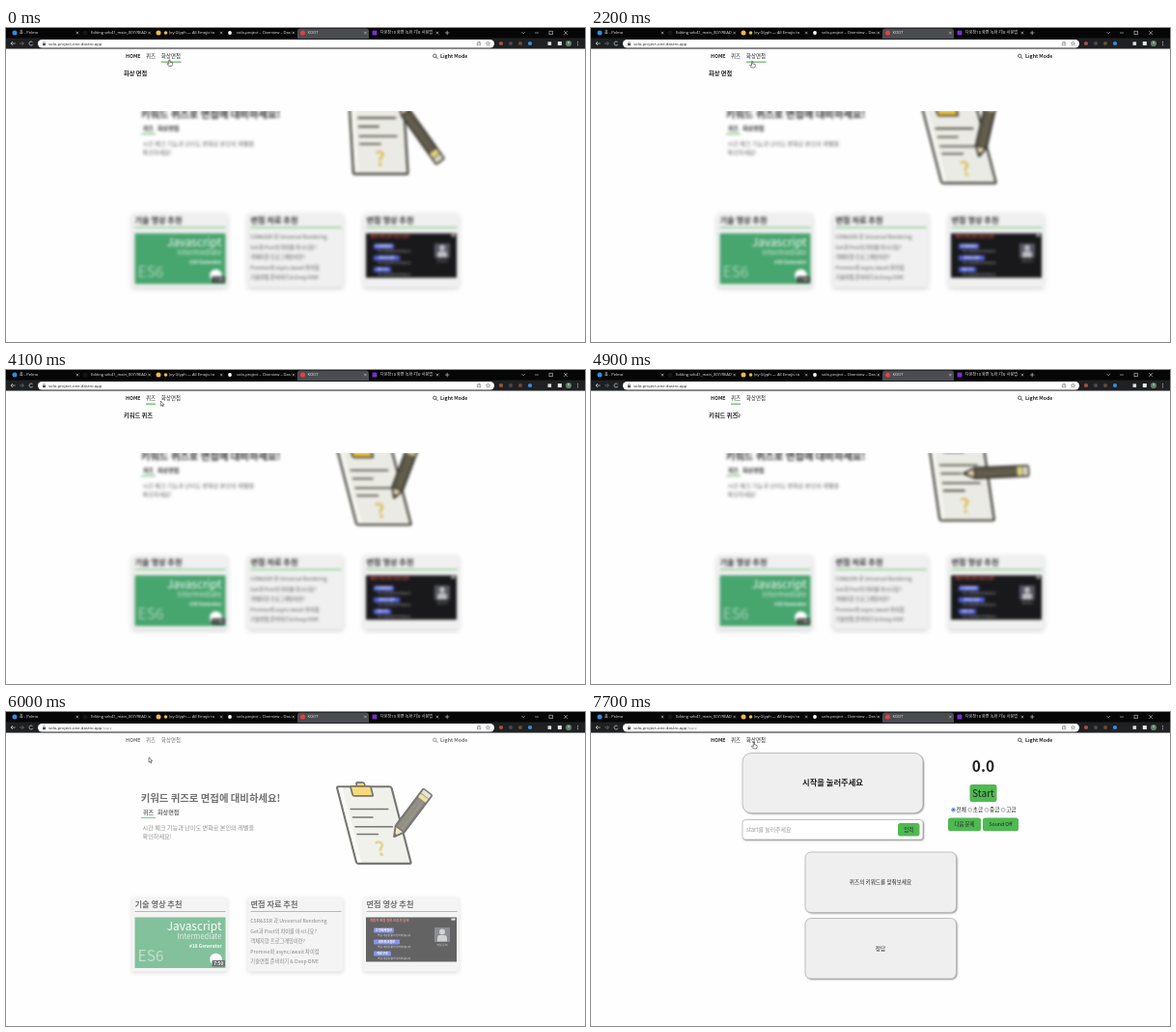
An HTML page with a canvas that plays this animation: 600x325 px, repeating every 8 s.

```html
<!DOCTYPE html>
<html lang="ko">
<head>
<meta charset="utf-8">
<title>KOOT</title>
<style>
html, body { margin: 0; width: 100%; height: 100%; overflow: hidden; background: #fff; }
canvas { display: block; width: 600px; height: 325px; }
</style>
</head>
<body>
<canvas id="stage"></canvas>
<script>
const W = 600, H = 325, LOOP = 8000;
const KR = '"Noto Sans CJK KR", "Noto Sans CJK", sans-serif';
const UI = '"Open Sans", "Noto Sans CJK KR", "Noto Sans CJK", sans-serif';
const GREEN = '#4caf50', INK = '#222', PAPER = '#fefefe';
const dpr = window.devicePixelRatio || 1;

function surface(el) {
  el.width = W * dpr;
  el.height = H * dpr;
  const ctx = el.getContext('2d');
  ctx.scale(dpr, dpr);
  return ctx;
}
const screen2d = surface(document.getElementById('stage'));
const pageCanvas = document.createElement('canvas');
const page2d = surface(pageCanvas);
let c = screen2d;

const clamp = v => Math.max(0, Math.min(1, v));
const ramp = (t, a, b) => clamp((t - a) / (b - a));
const ease = u => u * u * (3 - 2 * u);
const mix = (a, b, u) => a + (b - a) * u;

function text(s, x, cy, size, { color = INK, weight = 400, align = 'left', font = KR } = {}) {
  c.font = `${weight} ${size}px ${font}`;
  c.textAlign = align;
  c.fillStyle = color;
  c.fillText(s, x, cy + size * 0.36);
}
function rect(x, y, w, h, color) {
  c.fillStyle = color;
  c.fillRect(x, y, w, h);
}
function round(x, y, w, h, r, fill, stroke, lw = 1) {
  c.beginPath();
  c.roundRect(x, y, w, h, r);
  if (fill) { c.fillStyle = fill; c.fill(); }
  if (stroke) { c.strokeStyle = stroke; c.lineWidth = lw; c.stroke(); }
}
function dot(x, y, r, fill, stroke, lw = 0.6) {
  c.beginPath();
  c.arc(x, y, r, 0, 7);
  if (fill) { c.fillStyle = fill; c.fill(); }
  if (stroke) { c.strokeStyle = stroke; c.lineWidth = lw; c.stroke(); }
}
function line(pts, color, lw) {
  c.beginPath();
  for (let i = 0; i < pts.length; i += 2) c.lineTo(pts[i], pts[i + 1]);
  c.strokeStyle = color;
  c.lineWidth = lw;
  c.stroke();
}
function poly(pts, fill, stroke, lw) {
  c.beginPath();
  for (let i = 0; i < pts.length; i += 2) c.lineTo(pts[i], pts[i + 1]);
  c.closePath();
  c.fillStyle = fill;
  c.fill();
  if (stroke) { c.strokeStyle = stroke; c.lineWidth = lw; c.stroke(); }
}
function cross(x, y, r, color = '#ccc', lw = 0.6) {
  line([x - r, y - r, x + r, y + r], color, lw);
  line([x - r, y + r, x + r, y - r], color, lw);
}
function shadow(color, blur, x, y) {
  c.shadowColor = color;
  c.shadowBlur = blur * dpr;
  c.shadowOffsetX = x * dpr;
  c.shadowOffsetY = y * dpr;
}
const noShadow = () => shadow('transparent', 0, 0, 0);

/* browser frame */
const tabs = [
  [9, '#2d8fe0', '홈 - Pelmo', 14],
  [82, '#151515', 'Editing seb41_main_007/READ', 88],
  [158, '#f4b942', 'Joy Glyph — All Emojis to', 169],
  [232, '#fff', 'solo-project – Overview – Dastro', 239],
  [307.5, '#e8413c', 'KOOT', 312.5],
  [382, '#7b2fd0', '다온창10 화면 녹화 기능 사용법', 388],
];
function browser(t) {
  rect(0, 0, W, 21.3, '#060607');
  rect(0, 10.5, W, 10.8, '#1f2022');
  round(302, 0.5, 74, 10.5, [3, 3, 0, 0], '#4b4c50');
  tabs.forEach(([x, color, label, tx], i) => {
    const closeX = 74 + i * 74.6;
    if (i === 5) rect(x - 2.4, 2.6, 4.8, 4.8, color);
    else dot(x, 5, i === 3 ? 1.9 : 2.5, color);
    if (i === 2) dot(165.5, 5, 1.8, '#f4b942');
    c.save();
    c.beginPath();
    c.rect(tx, 0, closeX - 2.5 - tx, 10);
    c.clip();
    text(label, tx, 5, 4.1, { color: '#eee', font: UI });
    c.restore();
    cross(closeX, 5, 1.3);
  });
  line([455, 5, 459.4, 5], '#ddd', 0.6);
  line([457.2, 2.8, 457.2, 7.2], '#ddd', 0.6);
  line([534.5, 4, 536.2, 5.8, 537.9, 4], '#ccc', 0.6);
  line([548, 5, 552, 5], '#ccc', 0.6);
  c.strokeRect(563, 3.2, 3.5, 3.5);
  cross(580, 5, 1.9);

  line([9.6, 16, 5, 16], '#ddd', 0.7);
  line([7, 14, 5, 16, 7, 18], '#ddd', 0.7);
  line([14, 16, 18.4, 16], '#777', 0.7);
  line([16.4, 14, 18.4, 16, 16.4, 18], '#777', 0.7);
  c.beginPath();
  c.arc(26, 16, 2, 0.4, 5.6);
  c.strokeStyle = '#ddd';
  c.stroke();

  round(33, 12, 473, 8.4, 4.2, '#fff');
  rect(38, 15.8, 3, 2.4, '#555');
  dot(39.5, 15.5, 1, null, '#555', 0.5);
  const host = 'solo-project-one.dastro.app';
  text(host, 44, 16, 4.3, { font: UI });
  if (t >= 5600) {
    const end = 44 + c.measureText(host).width;
    text('/quiz', end, 16, 4.3, { color: '#888', font: UI });
  }
  c.strokeStyle = '#666';
  c.lineWidth = 0.5;
  c.strokeRect(488.5, 15, 3.4, 2.8);
  line([490.2, 16.5, 490.2, 13.3], '#666', 0.5);
  c.beginPath();
  for (let i = 0; i < 10; i++) {
    const r = i % 2 ? 1 : 2.3, a = i * Math.PI / 5 - Math.PI / 2;
    c.lineTo(499.5 + r * Math.cos(a), 16.2 + r * Math.sin(a));
  }
  c.closePath();
  c.stroke();
  ['#a8504a', '#4a4a4c', '#6b4a38', '#3b8de0'].forEach((color, i) => dot(513 + i * 10, 16, 2.1, color));
  rect(561.5, 14.3, 3.6, 3.6, '#ddd');
  rect(571.8, 14, 4, 4, '#f0f0f0');
  dot(583, 16, 3.1, '#5d7f6a');
  text('Y', 583, 16, 3.8, { color: '#fff', align: 'center', font: UI });
  for (let i = -1; i < 2; i++) dot(592.5, 16 + i * 1.7, 0.5, '#ddd');
}

function nav() {
  text('HOME', 124, 29.5, 5.2, { weight: 700 });
  text('퀴즈', 145, 29.5, 5.4, { weight: 500 });
  text('화상면접', 161, 29.5, 5.4, { weight: 500 });
  dot(444.3, 28.8, 1.7, null, INK, 0.7);
  line([445.5, 30, 447.3, 31.8], INK, 0.8);
  text('Light Mode', 450, 29.5, 5.2, { weight: 700 });
}

/* clipboard and pencil, 2.5 s cycle */
function illustration(t) {
  const p = t % 2500;
  const back = p < 500 ? p + 2500 : p;
  const lean = ease(ramp(back, 600, 950)) * (1 - ease(ramp(back, 2200, 2640)));
  const sink = 4 * ramp(p, 950, 1650) * lean;
  const dark = '#2b2921';

  c.save();
  c.transform(1, 0, 0.25 * lean, mix(1, 0.965, lean), mix(358, 341.5, lean), mix(66, 76, lean) + sink);
  c.lineJoin = 'round';
  round(1, 1, 56.5, 82.5, 2, '#eaeae3', dark, 2.2);
  rect(2.4, 2.4, 4, 79.6, '#f7f7f2');
  c.lineCap = 'round';
  [[25, 48], [34, 30], [44, 48], [52, 31]].forEach(([y, x]) => line([9.5, y, x, y], dark, 1.6));
  text('?', 29.5, 68, 21, { color: '#d8bc58', weight: 700, align: 'center' });
  round(22, -3.5, 8.5, 6, 2, '#f0c02c', dark, 1.7);
  round(15.2, 0.5, 21, 10.5, 1.5, '#f2c42f', dark, 1.8);
  c.restore();

  // While writing, the pencil rocks about its tip.
  const swing = (156 - 13 * Math.cos((p - 1000) / 850 * 2 * Math.PI)) * Math.PI / 180;
  const half = 40, squash = 0.73;
  const tipX = 402, tipY = 129 + sink;
  const cx = tipX + Math.sin(swing) * half * squash;
  const cy = tipY + Math.cos(swing) * half * squash;
  c.save();
  c.translate(mix(432, cx, lean), mix(109, cy, lean));
  c.rotate(-swing * lean);
  c.scale(mix(1, 1.12, lean), mix(1, squash, lean));
  c.lineJoin = 'round';
  poly([-5, -26, 0, -half, 5, -26], '#e6d5a8', dark, 1.8);
  poly([-2, -35, 0, -half, 2, -35], dark);
  round(-5, -26, 10, 66, 1.5, '#544f3f', dark, 1.9);
  line([-1.6, -25, -1.6, 26], '#67624f', 1);
  line([1.9, -25, 1.9, 26], '#5f5a48', 0.8);
  rect(-4.3, 26, 8.6, 6, '#e2d27a');
  rect(-4.3, 33, 8.6, 6, '#d9d4bf');
  c.restore();
}

function card(x, title) {
  shadow('rgba(0,0,0,.2)', 4, 0, 1.5);
  round(x + 0.5, 191.5, 99, 77, 3, '#efefef');
  noShadow();
  text(title, x + 3.5, 199, 8.2, { weight: 700 });
  rect(x + 3.5, 206, 94, 0.9, GREEN);
}

function home(t) {
  rect(0, 21, W, H - 21, PAPER);
  text('키워드 퀴즈로 면접에 대비하세요!', 139.7, 89, 10.4, { weight: 700 });
  text('퀴즈', 142, 104, 5.9, { weight: 700 });
  text('화상면접', 157, 104, 6.1, { weight: 700 });
  rect(140, 109, 15, 1.1, GREEN);
  const soft = { color: '#555' };
  text('시간 체크 기능과 난이도 변화로 본인의 레벨을', 141.5, 120, 6.15, soft);
  text('확인하세요!', 141.5, 128.6, 6.15, soft);
  illustration(t);

  card(130, '기술 영상 추천');
  rect(133.5, 212.5, 94, 52.5, '#3c9f65');
  const white = { color: '#fff', align: 'right' };
  text('Javascript', 223.5, 222, 11.9, { ...white, weight: 500 });
  text('Intermediate', 223.5, 232.3, 7.6, { ...white, color: '#d3ecdd' });
  text('#18 Generator', 223.5, 242.3, 4.8, { ...white, weight: 700 });
  text('ES6', 136.5, 252.5, 15.5, { color: 'rgba(255,255,255,.5)' });
  dot(217.5, 256, 6.3, '#fff');
  round(213.5, 257, 13.5, 6.6, 1, '#1c1c1c');
  text('7:50', 220.2, 260.3, 4.8, { color: '#fff', weight: 700, align: 'center' });

  card(250, '면접 자료 추천');
  ['CSR&SSR 과 Universal Rendering', 'Get과 Post의 차이를 아시나요?', '객체지향 프로그래밍이란?',
    'Promise와 async/await 차이점', '기술면접 준비하기 & Deep DIVE']
    .forEach((s, i) => text(s, 253.3, 216.5 + i * 10.5, 5.25, { color: '#444' }));

  card(370, '면접 영상 추천');
  rect(373, 212.5, 94, 46, '#0b0b0d');
  text('개발자 면접 질문 모음과 답변', 377, 216, 3.4, { color: '#e5483c', weight: 700 });
  [['운영체제질문', 381, 223.5, 21], ['네트워크질문', 381, 235.5, 27], ['자료구조', 381, 247.5, 18]].forEach(([s, x, y, w]) => {
    round(x, y, w, 5, 1, '#4658dc');
    text(s, x + w / 2, y + 2.5, 3.2, { color: '#fff', weight: 700, align: 'center' });
    text('핵심 개념을 짧게 정리해 봅니다', x + 4, y + 7.7, 2.7, { color: '#ccc' });
  });
  rect(444, 223, 16, 15, '#4a4b56');
  dot(452, 227.5, 3, '#b8b8be');
  round(447, 231, 10, 6.5, [3, 3, 0, 0], '#b8b8be');
  text('면접 준비', 452, 241, 2.8, { color: '#ccc', align: 'center' });
  rect(461.5, 213.6, 4, 2, '#ddd');
  nav();
}

function panel(x, y, w, h, r, fill) {
  shadow('rgba(0,0,0,.45)', 2, 1, 1);
  round(x, y, w, h, r, fill);
  noShadow();
  round(x, y, w, h, r, fill, '#aaa', 0.7);
}
function button(x, y, w, h, label, size, weight = 500) {
  round(x, y, w, h, 2.5, '#4fb953');
  text(label, x + w / 2, y + h / 2, size, { weight, align: 'center' });
}
function quiz() {
  const mid = { align: 'center' };
  nav();
  panel(157, 42.5, 187, 62, 9, '#efefef');
  text('시작을 눌러주세요', 250.5, 73.5, 8.3, { ...mid, weight: 700 });
  panel(157, 111.5, 187, 20.5, 3, '#fff');
  text('start를 눌러주세요', 161, 121.8, 5.9, { color: '#999' });
  button(318, 115, 22.5, 13.5, '입력', 5.4);
  text('0.0', 406.5, 56.5, 15.5, { ...mid, weight: 700 });
  button(392.5, 75, 28, 18, 'Start', 10.2, 400);
  ['전체', '초급', '중급', '고급'].forEach((s, i) => {
    const x = 375.5 + i * 17.2;
    dot(x, 101.3, 1.9, '#fff', i ? '#777' : '#2a76d8', 0.6);
    if (!i) dot(x, 101.3, 1.2, '#2a76d8');
    text(s, x + 3.1, 101.2, 5.6);
  });
  button(370, 109.5, 34, 13.7, '다음 문제', 5.4);
  button(406, 109.5, 37, 13.7, 'Sound Off', 5.2);
  panel(222, 145, 156.5, 62.5, 6, '#efefef');
  text('퀴즈의 키워드를 맞춰보세요', 300, 176, 5.6, mid);
  panel(222, 213.5, 156.5, 62.5, 6, '#efefef');
  text('정답', 300, 244.8, 5.6, mid);
}

/* pointer: time, x, y of the hot spot */
const track = [
  [0, 169.5, 33], [700, 169.5, 33], [1200, 168.5, 35], [2100, 168.5, 35], [2800, 145, 28.5], [3200, 145.5, 29],
  [3600, 152, 30], [4000, 160.3, 32], [4500, 160.3, 32.5], [5100, 148, 47], [7250, 148, 47], [7650, 169, 31.5], [8000, 169, 31.5],
];
function pointer(t) {
  const i = track.findIndex((k, n) => n && t <= k[0]);
  const a = track[i - 1], b = track[i], u = ease(ramp(t, a[0], b[0]));
  const hand = t < 3700 || t > 7500;
  c.save();
  c.translate(mix(a[1], b[1], u), mix(a[2], b[2], u));
  c.lineJoin = 'round';
  const shape = hand
    ? [-0.6, 0, 0.5, 0, 0.6, 2.4, 3, 2.9, 3.2, 4.6, 2.4, 6.4, -0.8, 6.4, -2.6, 3.9, -1.8, 3.4, -0.7, 4.3]
    : [0, 0, 0, 5.2, 1.2, 4.1, 2, 5.9, 2.8, 5.5, 2, 3.8, 3.6, 3.7];
  poly(shape, '#fff', '#222', 0.55);
  c.restore();
}

function menu(t) {
  const onQuiz = t >= 3250;
  const shown = 1 - ramp(t, 5330, 5450);
  c.save();
  c.globalAlpha = shown;
  c.beginPath();
  c.rect(0, 86, W, H - 86);
  c.clip();
  c.filter = `blur(${1.6 * dpr}px)`;
  c.drawImage(pageCanvas, 0, 0, W, H);
  c.filter = 'none';
  rect(0, 86, W, H - 86, 'rgba(255,255,255,.06)');
  c.restore();
  c.save();
  c.globalAlpha = shown;
  rect(0, 21, W, 65, PAPER);
  text(onQuiz ? '키워드 퀴즈' : '화상 면접', 122, 46.5, 6.2, { weight: 700 });
  const [x, w] = onQuiz ? [145, 10] : [161, 20.5];
  rect(x, 34.6, w, 1.1, GREEN);
  c.restore();
  nav();
}

function draw(t) {
  const first = t < 6400;
  c = page2d;
  rect(0, 0, W, H, PAPER);
  if (first) home(t);
  else quiz();

  c = screen2d;
  rect(0, 0, W, H, PAPER);
  c.globalAlpha = first ? 1 - ramp(t, 5800, 6350) : ramp(t, 6400, 6900);
  c.drawImage(pageCanvas, 0, 0, W, H);
  c.globalAlpha = 1;
  if (t < 5450) menu(t);
  browser(t);
  pointer(t);
}

const start = performance.now();
function tick() {
  draw(Math.max(0, performance.now() - start) % LOOP);
  requestAnimationFrame(tick);
}
tick();
</script>
</body>
</html>
```
